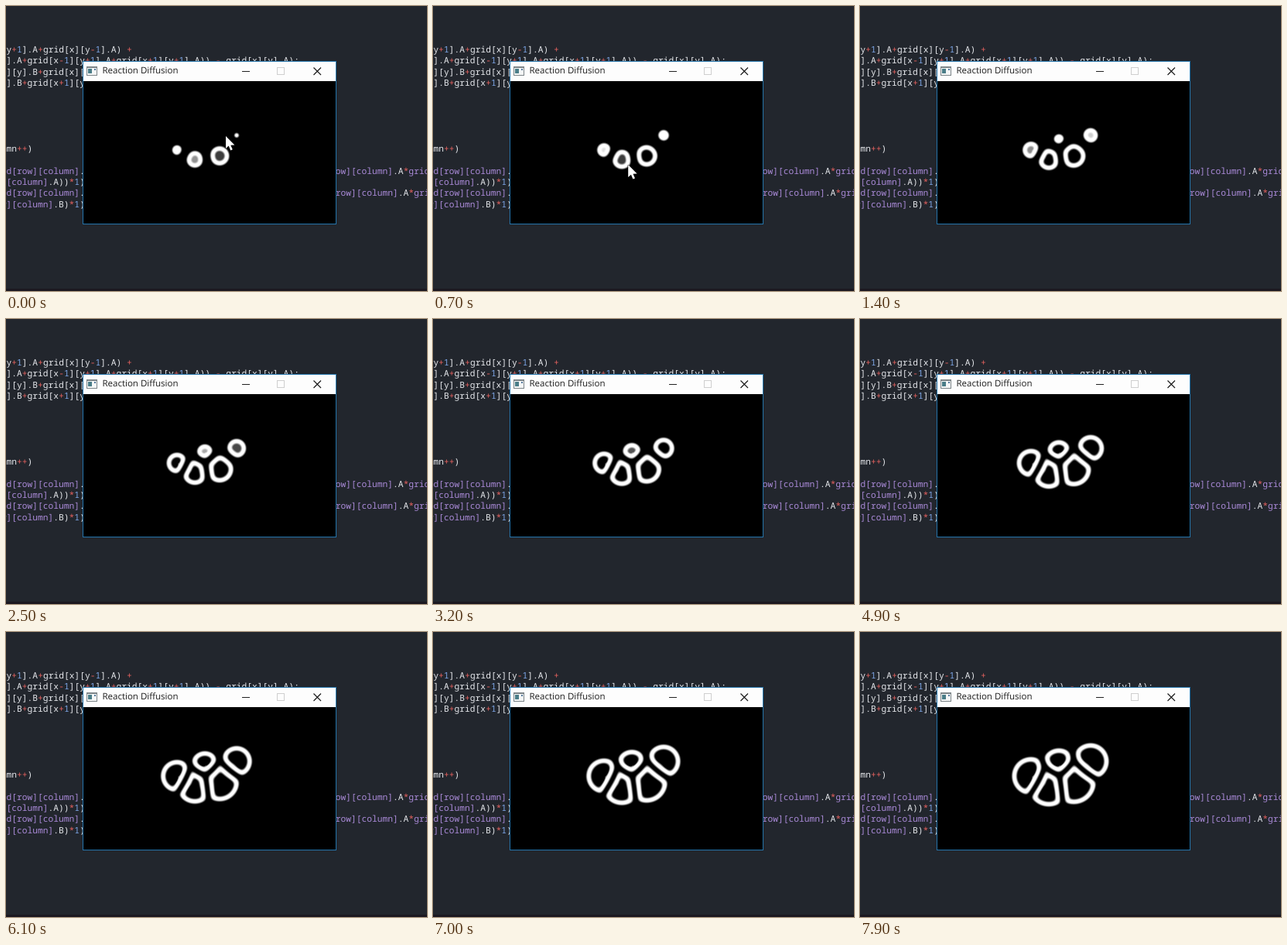
An HTML page with a canvas that plays this animation: 544x368 px, repeating every 8 s.

```html
<!DOCTYPE html>
<html>
<head>
<meta charset="utf-8">
<style>
html, body { margin: 0; width: 100%; height: 100%; overflow: hidden; background: #22262d; }
#stage { position: absolute; left: 0; top: 0; width: 544px; height: 368px; overflow: hidden; }
#floor { position: absolute; left: 0; top: 365px; width: 544px; height: 3px; background: #1c1820; }
.line { position: absolute; white-space: pre; color: #e6e8ec;
  font: 500 11.25px/14px "Noto Sans Mono", "DejaVu Sans Mono", monospace;
  font-variant-ligatures: none; text-rendering: geometricPrecision; }
.op { color: #e8625f; }
.num { color: #7da5e6; }
.id { color: #aa8ad8; }
canvas { position: absolute; left: 0; top: 0; }
#title { position: absolute; left: 124.5px; top: 76px; white-space: pre; color: #1c1c1c;
  font: 11.5px/16px "Open Sans", "Noto Sans", sans-serif; text-rendering: geometricPrecision; }
</style>
</head>
<body>
<div id="stage">
  <div id="floor"></div>
  <div id="code"></div>
  <canvas id="view" width="544" height="368"></canvas>
  <div id="title">Reaction Diffusion</div>
</div>
<script>
const LOOP = 8000, STEP = 100;
const ctx = document.getElementById('view').getContext('2d');
const clamp = v => Math.max(0, Math.min(1, v));
const mix = (a, b, u) => a + (b - a) * u;
const smooth = (a, b, v) => { const u = clamp((v - a) / (b - a)); return u * u * (3 - 2 * u); };

// Code behind the window: row, column, text, purple identifiers
const PITCH = 6.75, ROW = 14.25, LEFT = -6.2;
function addLine(row, col, text, purple) {
  const el = document.createElement('div');
  el.className = 'line';
  el.style.left = LEFT + col * PITCH + 'px';
  el.style.top = 50 + row * ROW + 'px';
  el.innerHTML = text.replace(/\.[AB]|[+\-*]+|\d|[a-z\[\]]+/g, s => {
    const kind = /^[+\-*]/.test(s) ? 'op' : /\d/.test(s) ? 'num'
      : purple && s[0] !== '.' ? 'id' : '';
    return kind ? `<span class="${kind}">${s}</span>` : s;
  });
  document.getElementById('code').append(el);
}
addLine(0, 0, '[y+1].A+grid[x][y-1].A) +');
addLine(1, 0, '1].A+grid[x-1][y+1].A+grid[x+1][y+1].A)) - grid[x][y].A);');
addLine(2, 0, '1][y].B+grid[x][');
addLine(3, 0, '1].B+grid[x+1][y');
addLine(9, 0, 'umn++)');
addLine(11, 0, 'id[row][column].', true);
addLine(11, 63, 'row][column].A*grid[', true);
addLine(12, 0, '][column].A))*1)', true);
addLine(13, 0, 'id[row][column].', true);
addLine(13, 64, 'row][column].A*grid', true);
addLine(14, 0, 'w][column].B)*1)', true);

// Drops spread as discs and stop at a gap from each other
const drops = [
  { x: 221, y: 186, born: -0.55 },
  { x: 244, y: 198, born: -1.9 },
  { x: 276, y: 193.5, born: -2.6 },
  { x: 298, y: 167, born: 0 },
  { x: 257, y: 172, born: 0.8 }
];
const GAP = 3.6, ROUND = 1.8;
const radius = age => 4 + 2.05 * age + 4.5 * (1 - Math.exp(-age / 0.8));

// Distance from a point inside drop a to its edge, with rounded corners
function depth(a, list) {
  let sum = Math.exp(-a.room / ROUND);
  for (const b of list) {
    if (b === a) continue;
    const slope = Math.hypot(a.dx / a.dist - b.dx / b.dist, a.dy / a.dist - b.dy / b.dist);
    const s = (a.room - b.room) / Math.max(slope, 0.3) - GAP / 2;
    sum += Math.exp(-s / ROUND);
  }
  return -ROUND * Math.log(sum);
}

function glow(x, y, list) {
  let best = null;
  for (const d of list) {
    d.dx = x - d.x;
    d.dy = y - d.y;
    d.dist = Math.hypot(d.dx, d.dy) || 0.01;
    d.room = d.r - d.dist;
    if (!best || d.room > best.room) best = d;
  }
  if (best.room <= 0) return 0;
  const s = depth(best, list);
  return smooth(-0.3, 3, s) * mix(1, best.core, smooth(5.5, 9, s));
}

const X = 100, Y = 97, W = 326, H = 184;
const pixels = ctx.createImageData(W, H);
function drawDrops(t) {
  const now = t / 1000;
  const list = drops.filter(d => now >= d.born);
  for (const d of list) {
    d.r = radius(now - d.born);
    d.core = clamp((3.1 - now + d.born) / 2.1);
  }
  for (let i = 0; i < W * H; i++) {
    const v = 255 * glow(X + i % W + 0.5, Y + Math.floor(i / W) + 0.5, list);
    pixels.data.fill(v, 4 * i, 4 * i + 3);
    pixels.data[4 * i + 3] = 255;
  }
  ctx.putImageData(pixels, X, Y);
}

function box(x, y, w, h, color) {
  ctx.fillStyle = color;
  ctx.fillRect(x, y, w, h);
}

function drawWindow() {
  box(99, 71, 328, 211, '#2474ab');
  box(X, 72, W, 25, '#fdfdfd');
  // icon
  box(104, 78, 14, 12, '#7c8488');
  box(105, 80, 12, 9, '#f4f6f6');
  box(106, 81, 5, 6, '#4a7d88');
  box(114, 81, 2, 2, '#56799c');
  // buttons
  box(305, 84, 10, 1, '#222');
  ctx.lineWidth = 1;
  ctx.strokeStyle = '#cfcfcf';
  ctx.strokeRect(350.5, 79.5, 9, 9);
  ctx.strokeStyle = '#1c1c1c';
  ctx.lineWidth = 1.2;
  ctx.beginPath();
  ctx.moveTo(397.5, 79.5); ctx.lineTo(407, 89);
  ctx.moveTo(407, 79.5); ctx.lineTo(397.5, 89);
  ctx.stroke();
}

function drawCursor(t) {
  if (t > 850) return;
  const over = smooth(0, 400, t), away = clamp((t - 550) / 250);
  ctx.save();
  ctx.translate(mix(284, 257, over) - 8 * away, mix(168, 172, over) + 92 * away * away);
  ctx.beginPath();
  [[0, 0], [0, 16], [3.7, 12.6], [6.2, 18.4], [8.8, 17.3], [6.3, 11.7], [11.4, 11.4]]
    .forEach(p => ctx.lineTo(...p));
  ctx.closePath();
  ctx.fillStyle = '#fff';
  ctx.strokeStyle = '#000';
  ctx.lineWidth = 1;
  ctx.stroke();
  ctx.fill();
  ctx.restore();
}

function draw(t) {
  ctx.clearRect(0, 0, 544, 368);
  drawWindow();
  drawDrops(t);
  drawCursor(t);
}

const start = performance.now();
let shown = -1;
function tick() {
  const t = Math.floor((performance.now() - start) % LOOP / STEP) * STEP;
  if (t !== shown) draw(shown = t);
  requestAnimationFrame(tick);
}
tick();
</script>
</body>
</html>
```
